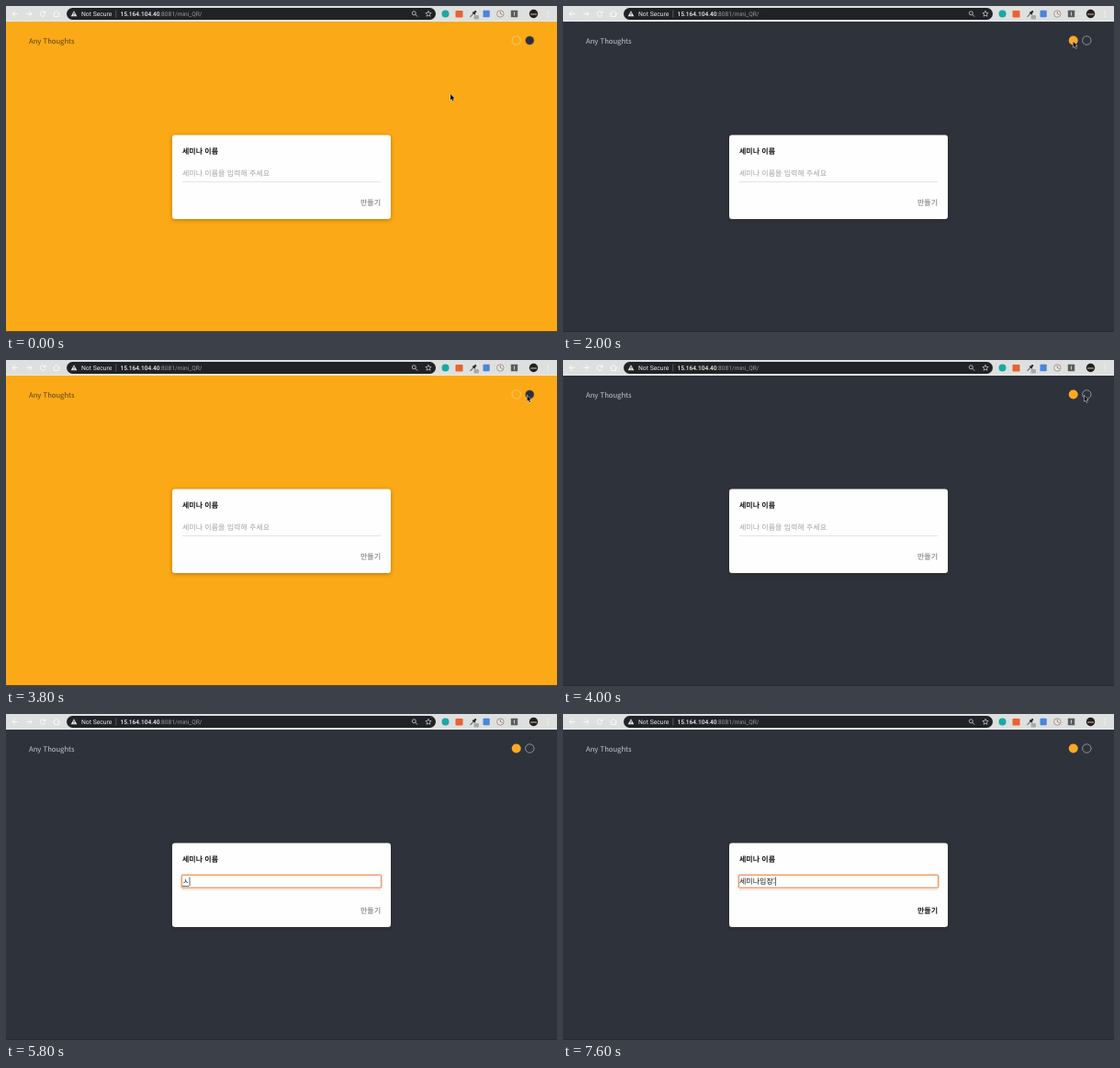
Animation, 600 px wide and 355 px high, one loop 8 s. Source, as an HTML page with a canvas:

```html
<!DOCTYPE html>
<html lang="ko">
<head>
<meta charset="utf-8">
<title>Seminar form</title>
<style>
html, body { margin: 0; width: 100%; height: 100%; overflow: hidden; background: #2e323b; }
canvas { display: block; width: 600px; height: 355px; }
</style>
</head>
<body>
<canvas id="stage"></canvas>
<script>
const W = 600, H = 355, LOOP = 8000, STEP = 200;
const KR = '"Noto Sans CJK KR", "Noto Sans CJK", sans-serif';
const UI = 'Roboto, sans-serif';
const ORANGE = '#fba916', DARK = '#2e323b';

const canvas = document.getElementById('stage');
const ctx = canvas.getContext('2d');
const dpr = window.devicePixelRatio || 1;
canvas.width = W * dpr;
canvas.height = H * dpr;

// Pointer keys: time, x, y
const pointerPath = [
  [0, 484, 96], [1200, 567.5, 38], [1400, 567.5, 38], [2000, 555.5, 38.5],
  [2800, 555.5, 38.5], [3800, 567.5, 38.5], [4000, 567.5, 38.5],
  [4600, 318, 182], [5000, 318, 182], [5400, 326, 254], [LOOP, 326, 254]
];
// Typed value from each time on
const typing = [
  [5800, 'ㅅ'], [6000, '세'], [6200, '세미'], [6600, '세민'], [6800, '세미나'],
  [7000, '세미나이'], [7200, '세미나입'], [7400, '세미나입장'], [7600, '세미나입장:']
];

function pointerAt(t) {
  const i = pointerPath.findIndex(k => k[0] > t);
  const [t0, x0, y0] = pointerPath[i - 1], [t1, x1, y1] = pointerPath[i];
  const p = (t - t0) / (t1 - t0), e = p * p * (3 - 2 * p);
  return [x0 + (x1 - x0) * e, y0 + (y1 - y0) * e];
}

function typedAt(t) {
  const past = typing.filter(k => k[0] <= t);
  return past.length ? past[past.length - 1][1] : '';
}

function text(s, x, y, font, color, align = 'left') {
  ctx.font = font;
  ctx.fillStyle = color;
  ctx.textAlign = align;
  ctx.fillText(s, x, y);
}

function rect(x, y, w, h, color) {
  ctx.fillStyle = color;
  ctx.fillRect(x, y, w, h);
}

function paint(fill, stroke, width) {
  if (fill) { ctx.fillStyle = fill; ctx.fill(); }
  if (stroke) { ctx.strokeStyle = stroke; ctx.lineWidth = width; ctx.stroke(); }
}

function box(x, y, w, h, r, fill, stroke, width = 1) {
  ctx.beginPath();
  ctx.roundRect(x, y, w, h, r);
  paint(fill, stroke, width);
}

function dot(x, y, r, fill, stroke, width = 1) {
  ctx.beginPath();
  ctx.arc(x, y, r, 0, 2 * Math.PI);
  paint(fill, stroke, width);
}

function poly(points, fill, stroke, width = 1, close = true) {
  ctx.beginPath();
  points.forEach(([x, y]) => ctx.lineTo(x, y));
  if (close) ctx.closePath();
  paint(fill, stroke, width);
}

function line(x0, y0, x1, y1, color, width = 1) {
  poly([[x0, y0], [x1, y1]], null, color, width, false);
}

function navArrow(x, dir) {
  line(x - 3, 8.5, x + 3, 8.5, '#fbfbfb', 0.9);
  poly([[x, 5.5], [x + 3 * dir, 8.5], [x, 11.5]], null, '#fbfbfb', 0.9, false);
}

function star(x, y, r) {
  const pts = [];
  for (let i = 0; i < 10; i++) {
    const a = -Math.PI / 2 + i * Math.PI / 5, d = i % 2 ? r * 0.45 : r;
    pts.push([x + d * Math.cos(a), y + d * Math.sin(a)]);
  }
  poly(pts, null, '#d5d6d8', 0.7);
}

function toolbar() {
  rect(0, 0, W, 17, '#dee0df');
  rect(0, 16, W, 1, '#e4ebe4');
  navArrow(10, -1);
  navArrow(25, 1);
  ctx.beginPath();
  ctx.arc(40, 8.5, 2.8, 0.3, 5.4);
  paint(null, '#fbfbfb', 0.9);
  poly([[43.2, 5], [43.2, 8], [40.4, 8]], '#fbfbfb');
  poly([[51.5, 8.5], [55, 5.3], [58.5, 8.5], [57.5, 8.5], [57.5, 11.5], [52.5, 11.5], [52.5, 8.5]], null, '#fbfbfb', 0.9);

  box(66, 2, 402, 13, 6.5, '#202225');
  poly([[74, 5.2], [77.3, 11.2], [70.7, 11.2]], '#e6e7e8');
  rect(73.6, 7.2, 0.8, 2, '#202225');
  rect(73.6, 9.7, 0.8, 0.8, '#202225');
  text('Not Secure', 82, 10.8, '6.8px ' + UI, '#e8eaed');
  rect(119.5, 4.5, 0.7, 8, '#6d7074');
  text('15.164.104.40', 124.5, 10.8, '500 6.6px ' + UI, '#f2f3f4');
  text(':8081/mini_QR/', 167.5, 10.8, '6.6px ' + UI, '#9a9da1');
  dot(444.3, 7.8, 2, null, '#d5d6d8', 0.8);
  line(445.8, 9.3, 448, 11.5, '#d5d6d8', 0.9);
  star(460, 8.6, 3.3);

  dot(478.5, 8.5, 4, '#19a9a5');
  box(489.5, 5, 8, 7.5, 0.8, '#e9622f');
  line(505.5, 11.8, 509.3, 8, '#6b6f73', 1.2);
  line(508.2, 6.8, 511, 9.2, '#202225', 1.4);
  line(509.5, 7.8, 511.8, 5.5, '#202225', 2);
  box(509.5, 10, 5.5, 4.5, 1, '#a6aaac');
  box(519.5, 4.8, 7.2, 7.4, 0.8, '#4b85dc');
  dot(538.3, 8.5, 3.7, '#e9e5e2', '#8d8582', 0.8);
  poly([[538.3, 6], [538.3, 8.5], [540.5, 9.5]], null, '#9b5a4c', 0.8, false);
  box(549.8, 4.8, 7.4, 7.4, 0.5, '#5a5c5d');
  rect(553, 6.5, 0.9, 4, '#d8d9d9');
  dot(574.5, 8.5, 4.7, '#22201f');
  rect(571, 8.3, 7, 1.4, '#a58f82');
  [5.7, 8.5, 11.3].forEach(y => dot(590, y, 0.7, '#f8f8f8'));
}

function page(dark) {
  rect(0, 17, W, H - 17, dark ? DARK : ORANGE);
  rect(0, 354, W, 1, dark ? '#29273c' : '#55412b');
  text('Any Thoughts', 25, 40.8, '300 7.7px ' + KR, dark ? '#c9cacd' : '#5a4013');
  if (dark) {
    dot(555.7, 37.5, 5, '#faa922');
    dot(570.3, 37.5, 4.7, null, '#a9acb1', 0.8);
  } else {
    dot(555.7, 37.5, 4.7, null, '#fcd07f', 0.8);
    dot(570.3, 37.5, 4.8, '#2b313b', '#c9913a', 0.5);
  }
}

function card(t, typed, focused) {
  ctx.save();
  ctx.shadowColor = 'rgba(60, 40, 0, .38)';
  ctx.shadowBlur = 4 * dpr;
  ctx.shadowOffsetY = dpr;
  box(181, 140.5, 238, 91.5, 3, '#fefefe');
  ctx.restore();
  text('세미나 이름', 192, 160.6, 'bold 8px ' + KR, '#1b1b1b');
  rect(192, 191, 216, 0.8, '#dcdcdc');
  if (focused) {
    box(191.3, 175.3, 217.4, 14, 1, null, 'rgba(240, 150, 90, .35)', 2);
    box(191.3, 175.3, 217.4, 14, 1, null, '#e58a50', 0.9);
  }
  if (typed) {
    text(typed, 192, 184.7, '8px ' + KR, '#161616');
    const end = 192 + ctx.measureText(typed).width;
    if (!typed.endsWith(':')) rect(end - 7.4, 187, 7.4, 0.7, '#333');
    rect(end + 0.3, 177.5, 0.7, 9.5, '#222');
  } else {
    text('세미나 이름을 입력해 주세요', 192, 184.7, '8px ' + KR, '#a3a3a3');
    if (focused) rect(192, 177.5, 0.7, 9.5, '#222');
  }
  text('만들기', 408, 217, 'bold 8px ' + KR, t >= 6200 ? '#1b1b1b' : '#999', 'right');
}

function pointer(t) {
  const [x, y] = pointerAt(t);
  ctx.save();
  ctx.translate(x, y);
  ctx.lineJoin = 'round';
  if (t >= 4600 && t < 5200) {
    rect(-0.4, -4, 0.8, 8, '#333');
    rect(-1.6, -4.3, 3.2, 0.7, '#333');
    rect(-1.6, 3.7, 3.2, 0.7, '#333');
  } else {
    const shape = [[0, 0], [0, 6.4], [1.4, 5.1], [2.5, 7.6], [3.6, 7.1], [2.5, 4.7], [4.5, 4.6]];
    poly(shape, '#0b0b0b', '#f4f4f4', 1);
    poly(shape, '#0b0b0b');
  }
  ctx.restore();
}

function draw(t) {
  ctx.setTransform(dpr, 0, 0, dpr, 0, 0);
  ctx.textRendering = 'geometricPrecision';
  const dark = (t >= 1400 && t < 2800) || t >= 4000;
  page(dark);
  toolbar();
  card(t, typedAt(t), t >= 5000);
  if (t < 5800) pointer(t);
}

const start = performance.now();
function tick() {
  const t = (performance.now() - start) % LOOP;
  draw(Math.floor(t / STEP) * STEP);
  requestAnimationFrame(tick);
}
tick();
</script>
</body>
</html>
```
